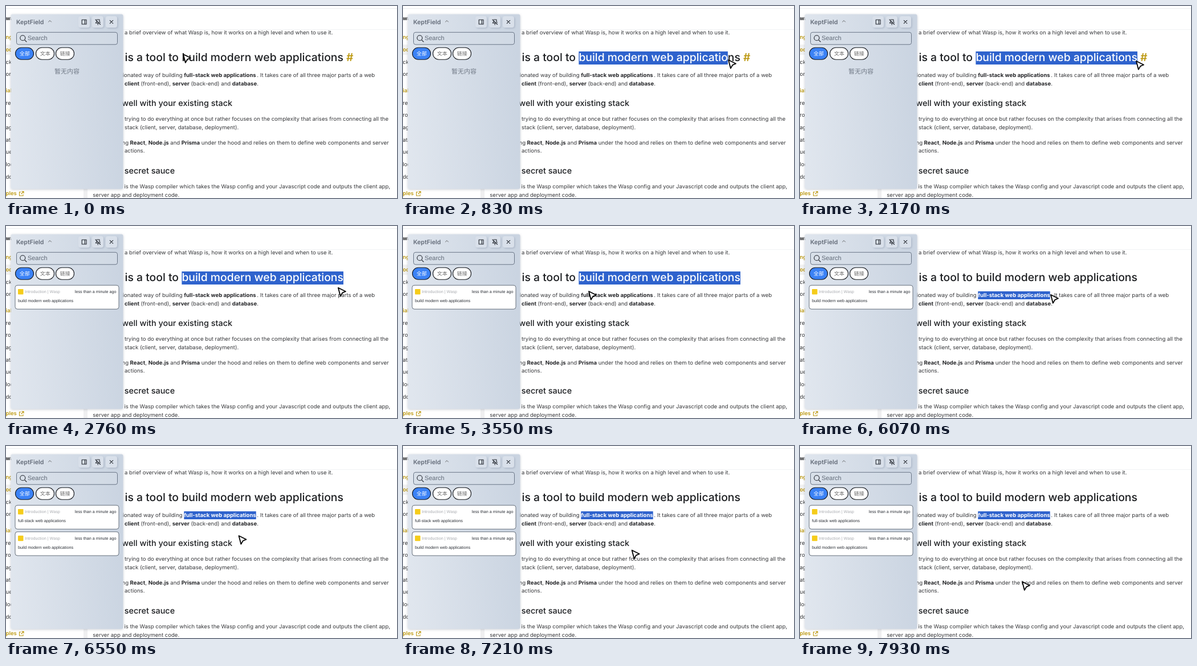
Recreate the animation shown at these times as an HTML page. Size 686 by 338 pixels, loop 8 s.

```html
<!DOCTYPE html>
<html lang="en">
<head>
<meta charset="utf-8">
<title>Clipboard panel</title>
<style>
  html, body { margin: 0; width: 100%; height: 100%; overflow: hidden; background: #fff; }
  svg { display: block; }
  text { white-space: pre; text-rendering: geometricPrecision; }
  .body { font: 400 9.56px Inter, sans-serif; fill: #36373a; }
  .bold { font-weight: 700; fill: #26272a; }
  .h2 { font: 500 19.35px Inter, sans-serif; fill: #1c1e21; }
  .h3 { font: 500 14.4px Inter, sans-serif; fill: #1c1e21; }
  .gold { fill: #bd9a14; font-weight: 600; }
  .ui { font: 7.22px "Liberation Sans", Arial, sans-serif; fill: #2b2f36; }
  .muted { fill: #a9abb0; }
  .title { font: 600 10.6px Inter, sans-serif; fill: #636b78; }
  .search { font: 10.9px "Liberation Sans", Arial, sans-serif; fill: #626b78; }
  .cjk { font: 9px "Noto Sans CJK SC", "Noto Sans CJK", sans-serif; fill: #666; }
  .empty { font-size: 11px; fill: #707986; }
  .icon { fill: none; stroke: #20242b; stroke-width: 1.1; stroke-linecap: round; stroke-linejoin: round; }
  .white { fill: #fff; }
</style>
</head>
<body>
<svg id="stage" width="686" height="338" viewBox="0 0 686 338">
  <defs>
    <linearGradient id="panelFill" x1="0" y1=".55" x2="1" y2=".45">
      <stop offset="0" stop-color="#e0e6ee"/>
      <stop offset="1" stop-color="#cad4e1"/>
    </linearGradient>
    <filter id="panelShadow" x="-10%" y="-10%" width="120%" height="120%">
      <feDropShadow dx="0" dy="1" stdDeviation="2.2" flood-color="#6f7b8d" flood-opacity=".38"/>
    </filter>
    <filter id="buttonShadow" x="-40%" y="-40%" width="180%" height="180%">
      <feDropShadow dx="1.5" dy="1.5" stdDeviation="1.8" flood-color="#8996aa" flood-opacity=".45"/>
    </filter>
  </defs>
  <g id="page"></g>
  <g id="panel"></g>
  <path id="cursor" d="M0 0 L13 6.5 L7.3 8.9 L3.8 14.8 Z" fill="#fff" stroke="#000" stroke-width="1.8" stroke-linejoin="round"/>
</svg>
<script>
const LOOP = 8000;
const page = document.getElementById('page');
const panel = document.getElementById('panel');
const cursor = document.getElementById('cursor');

function add(parent, tag, attrs = {}, content) {
  const el = document.createElementNS('http://www.w3.org/2000/svg', tag);
  for (const [key, value] of Object.entries(attrs)) el.setAttribute(key, value);
  if (content) el.textContent = content;
  parent.appendChild(el);
  return el;
}
const write = (parent, cls, x, y, content, anchor = 'start') =>
  add(parent, 'text', { class: cls, x, y, 'text-anchor': anchor }, content);
const box = (parent, x, y, width, height, fill, more = {}) =>
  add(parent, 'rect', { x, y, width, height, fill, ...more });
const icon = (parent, d) => add(parent, 'path', { class: 'icon', d });

// Asterisks mark bold runs.
function rich(x, y, content) {
  const line = write(page, 'body', x, y);
  content.split('*').forEach((run, i) => run && add(line, 'tspan', i % 2 ? { class: 'bold' } : {}, run));
}

function buildPage() {
  box(page, 0, 4, 686, 1, '#eceef0');
  box(page, 143, 41, 543, 1, '#f1f2f4');
  box(page, 0, 68, 136, 18, '#f2f2f2');
  box(page, 136, 41, 7, 297, '#efeff0');

  const sidebar = [
    ['wasp', 22, 'bold'], ['ng Started', 55, 'gold'], ['oduction', 77, 'gold'], ['ck Start', 99], ['or Setup', 120],
    ['ial', 149, 'gold'], ['reating', 171], ['roject', 192], ['ages', 214], ['atabase', 236],
    ['uerying', 257], ['lodifying', 279], ['dding', 301], ['ples', 330, 'gold']
  ];
  for (const [label, y, cls = ''] of sidebar) write(page, 'body ' + cls, -0.5, y + 3.2, label);
  add(page, 'path', {
    d: 'M26 327.5H23.5V334H30V331.5M27.5 326.5H31V330M31 326.5L26.5 331',
    fill: 'none', stroke: '#bd9a14', 'stroke-width': 1.1
  });

  rich(208, 50.3, 'a brief overview of what Wasp is, how it works on a high level and when to use it.');
  write(page, 'h2', 208.6, 97.2, 'is a tool to');
  const headline = write(page, 'h2', 308.4, 97.2, 'build modern web applications');
  const anchor = write(page, 'h2 gold', 597, 97.2, '#');

  write(page, 'body', 309.7, 125, 'Wasp is an opinionated way of building', 'end');
  const phrase = write(page, 'body bold', 312.3, 125, 'full-stack web applications');
  rich(440.3, 125, '. It takes care of all three major parts of a web');
  rich(208, 140, '*client* (front-end), *server* (back-end) and *database*.');

  write(page, 'h3', 397, 176.3, 'Works well with your existing stack', 'end');
  rich(208, 202.1, 'trying to do everything at once but rather focuses on the complexity that arises from connecting all the');
  rich(208, 217, 'stack (client, server, database, deployment).');
  write(page, 'body', 215, 243.8, 'Wasp is using', 'end');
  rich(217.6, 243.8, '*React*, *Node.js* and *Prisma* under the hood and relies on them to define web components and server');
  rich(208, 258.4, 'actions.');
  write(page, 'h3', 207.8, 294.8, 'secret sauce');
  write(page, 'body', 674, 321, 'is the Wasp compiler which takes the Wasp config and your Javascript code and outputs the client app,', 'end');
  rich(152.3, 335.7, 'server app and deployment code.');
  return { headline, anchor, phrase };
}

function buildCard() {
  const card = add(panel, 'g');
  box(card, 16, 104.3, 182, 42, '#fff', { rx: 4, stroke: '#66707d', 'stroke-width': 1 });
  box(card, 21, 111, 9.5, 9.5, '#f5cc1b', { rx: 1 });
  write(card, 'ui muted', 33, 118.3, 'Introduction | Wasp');
  write(card, 'ui', 193.5, 118.1, 'less than a minute ago', 'end');
  const label = write(card, 'ui', 21, 134.1);
  return { card, label };
}

function buildPanel() {
  box(panel, 8.5, 14.5, 197, 307.5, 'url(#panelFill)', { rx: 3, filter: 'url(#panelShadow)' });
  write(panel, 'title', 18, 32, 'KeptField');
  icon(panel, 'M74.5 28 L77 25.5 L79.5 28').setAttribute('style', 'stroke:#555;stroke-width:.9');
  for (const x of [127, 151, 175])
    box(panel, x, 18, 20, 20, '#d9e0ea', { rx: 4, filter: 'url(#buttonShadow)' });
  icon(panel, 'M133.2 24.2H141V32H133.2ZM138.3 24.2V32');
  icon(panel, 'M157 24L165.5 32.5M159 24H164V27L165 29.5M159 26V27.5L157.3 30H162.5M161.2 30V33');
  icon(panel, 'M182.3 25.3L187.7 30.7M187.7 25.3L182.3 30.7');

  box(panel, 18.5, 46.3, 177, 21.5, '#d6dee8', { rx: 3.5, 'fill-opacity': .6, stroke: '#697586', 'stroke-width': 1 });
  add(panel, 'circle', { class: 'icon', cx: 29.3, cy: 56.3, r: 4.5 });
  icon(panel, 'M32.7 59.8L36 63');
  write(panel, 'search', 38, 60.3, 'Search');

  [['全部', 16], ['文本', 52], ['链接', 87]].forEach(([label, x], i) => {
    box(panel, x + .5, 73.3, 32, 21, i ? '#fff' : '#3b82f6', { rx: 10.5, stroke: '#15181d', 'stroke-width': 1.1 });
    write(panel, 'cjk' + (i ? '' : ' white'), x + 16.7, 86.9, label, 'middle');
  });
  const empty = write(panel, 'cjk empty', 107, 119.3, '暂无内容', 'middle');
  return { empty, first: buildCard(), second: buildCard() };
}

function buildSelection(text, top, height, id) {
  const clip = add(page, 'clipPath', { id });
  const mask = box(clip, 0, top, 0, height, '#000');
  const group = add(page, 'g');
  const band = box(group, 0, top, 0, height, '#2f63cd');
  const copy = text.cloneNode(true);
  copy.setAttribute('style', 'fill:#fff');
  copy.setAttribute('clip-path', `url(#${id})`);
  group.appendChild(copy);

  const left = text.getStartPositionOfChar(0).x;
  const ends = [...text.textContent].map((_, i) => text.getEndPositionOfChar(i).x);
  return (visible, x) => {
    let right = left;
    for (const end of ends) if (x >= (right + end) / 2) right = end; else break;
    group.style.display = visible && right > left ? '' : 'none';
    for (const rect of [band, mask]) {
      rect.setAttribute('x', left);
      rect.setAttribute('width', right - left);
    }
  };
}

// time, x, y of the pointer tip
const path = [
  [0, 311, 85], [30, 312, 85], [830, 571, 95], [1100, 588, 97], [1280, 588, 97], [1550, 593, 97],
  [1830, 590, 97], [2600, 590, 97], [3000, 570, 130], [3500, 326, 115], [3600, 326, 115],
  [3830, 312, 118], [4200, 312, 118], [4900, 417, 118], [5350, 440, 121], [6300, 440, 121],
  [6550, 408.5, 158], [7140, 402, 182], [7880, 390, 239], [LOOP, 390, 239]
];
function pointerAt(t) {
  const i = Math.max(1, path.findIndex(step => step[0] >= t));
  const [t0, x0, y0] = path[i - 1], [t1, x1, y1] = path[i];
  const p = (t - t0) / (t1 - t0);
  const eased = p * p * (3 - 2 * p);
  return [x0 + (x1 - x0) * eased, y0 + (y1 - y0) * eased];
}

const { headline, anchor, phrase } = buildPage();
const { empty, first, second } = buildPanel();
const selectHeadline = buildSelection(headline, 80, 23, 'headlineClip');
const selectPhrase = buildSelection(phrase, 115, 14, 'phraseClip');
second.card.setAttribute('transform', 'translate(0 46.7)');
const show = (el, on) => { el.style.display = on ? '' : 'none'; };

function render(t) {
  const [x, y] = pointerAt(t);
  cursor.setAttribute('transform', `translate(${x} ${y})`);
  show(anchor, y < 106); // visible only while the heading is hovered
  selectHeadline(t < 3950, pointerAt(Math.min(t, 1830))[0]);
  selectPhrase(t >= 4200, pointerAt(Math.min(t, 5400))[0]);
  const copiedOnce = t >= 2650, copiedTwice = t >= 6250;
  show(empty, !copiedOnce);
  show(first.card, copiedOnce);
  show(second.card, copiedTwice);
  first.label.textContent = copiedTwice ? phrase.textContent : headline.textContent;
  second.label.textContent = headline.textContent;
}

const start = performance.now();
function tick() {
  render((performance.now() - start) % LOOP);
  requestAnimationFrame(tick);
}
tick();
</script>
</body>
</html>
```
